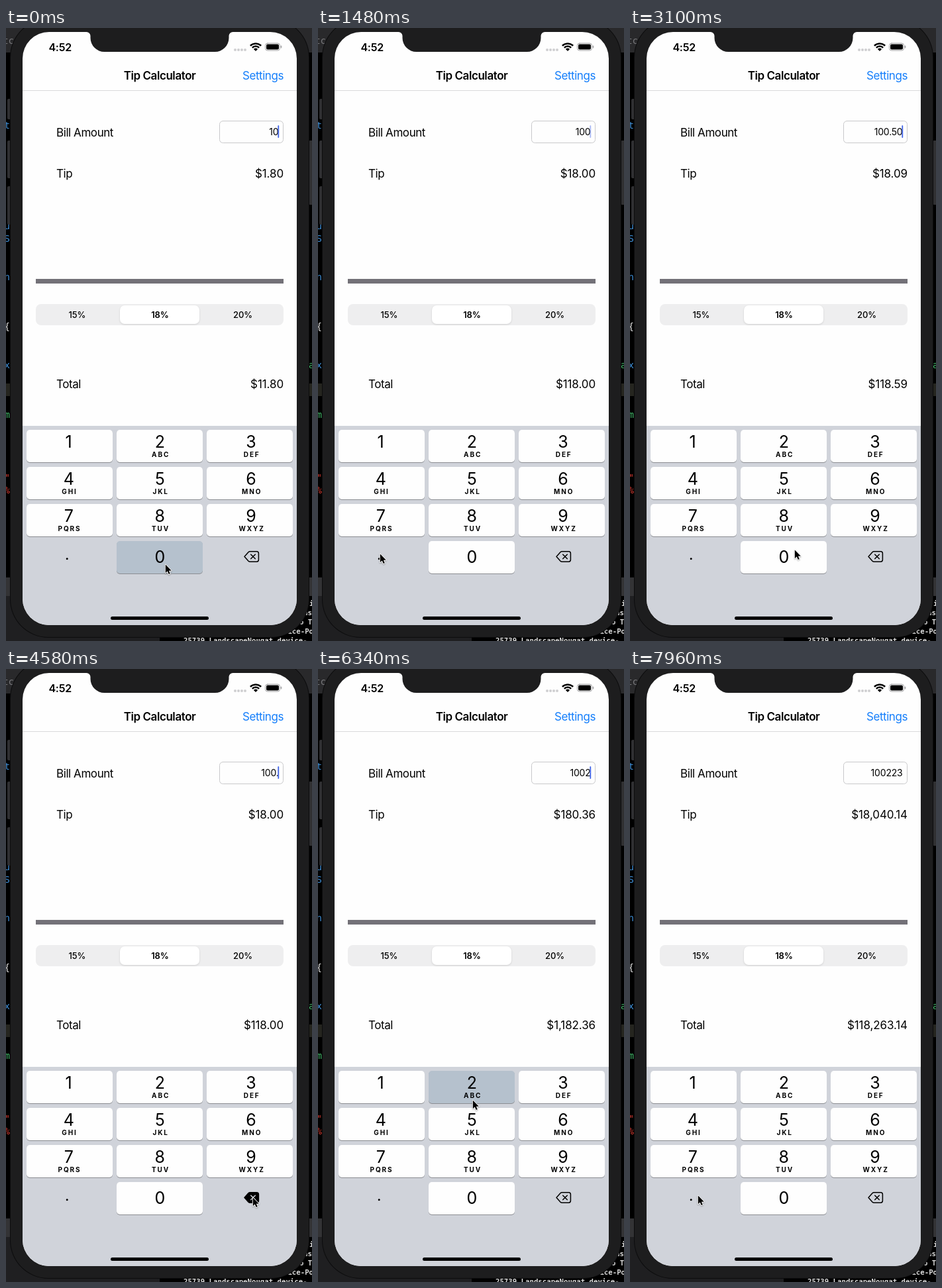
These frames come from a looping animation (462 px wide and 926 px high, 8000 ms). An HTML page with a canvas:

```html
<!DOCTYPE html>
<html lang="en">
<head>
<meta charset="utf-8">
<title>Tip Calculator</title>
<style>
html, body { margin: 0; width: 100%; height: 100%; overflow: hidden; background: #000; }
canvas { display: block; width: 462px; height: 926px; }
</style>
</head>
<body>
<canvas id="stage"></canvas>
<script>
const W = 462, H = 926, LOOP = 8000, STEP = 147.4;
const SANS = 'Inter, "Liberation Sans", sans-serif';
const MONO = '"DejaVu Sans Mono", monospace';
const BLUE = '#147efb';

const canvas = document.getElementById('stage');
const dpr = window.devicePixelRatio || 1;
canvas.width = W * dpr;
canvas.height = H * dpr;
const ctx = canvas.getContext('2d');

// [step, bill text]
const bills = [[-1, '10'], [6, '100'], [12, '100.'], [16, '100.5'], [19, '100.50'],
  [27, '100.5'], [31, '100.'], [35, '100'], [41, '1002'], [44, '10022'], [49, '100223']];

// [key, step down, step up]
const presses = [['0', 0, 1], ['0', 5, 7], ['5', 15, 17], ['del', 26, 28], ['del', 29, 32],
  ['del', 34, 36], ['2', 40, 42], ['2', 43, 44], ['3', 48, 50]];

// [step, x, y] of the pointer tip
const moves = [[0, 240, 809], [7, 240, 809], [10, 93, 793], [12, 93, 793], [15, 236, 688],
  [16, 236, 688], [18, 243, 793], [20, 243, 793], [21, 248, 787], [25, 372, 797],
  [35, 372, 797], [38, 239, 628], [40, 233, 650], [45, 233, 650], [47, 352, 640],
  [49, 350, 642], [53, 104, 794], [54, 102, 794]];

const keys = [['1', ''], ['2', 'ABC'], ['3', 'DEF'], ['4', 'GHI'], ['5', 'JKL'],
  ['6', 'MNO'], ['7', 'PQRS'], ['8', 'TUV'], ['9', 'WXYZ']];

function text(str, x, y, o = {}) {
  const { size = 17, weight = 400, color = '#000', align = 'left', gap = -0.43, font = SANS } = o;
  ctx.font = `${weight} ${size}px ${font}`;
  ctx.letterSpacing = gap + 'px';
  ctx.textAlign = align;
  ctx.fillStyle = color;
  ctx.fillText(str, x, y);
}

function box(x, y, w, h, color, r = 0) {
  ctx.fillStyle = color;
  ctx.beginPath();
  ctx.roundRect(x, y, w, h, r);
  ctx.fill();
}

function poly(points, x = 0, y = 0) {
  ctx.beginPath();
  points.forEach(([px, py]) => ctx.lineTo(x + px, y + py));
  ctx.closePath();
}

function backdrop() {
  box(0, 0, W, H, '#000');
  box(0, 0, W, 37, '#29292b');
  box(0, 537, W, 19, '#25251f');
  box(0, 830, W, 28, '#333335');
  box(0, 858, 232, 68, '#1f1f21');
  const code = (str, y, color, x = 6, align = 'right') =>
    text(str, x, y, { size: 14, font: MONO, gap: 0, color, align });
  code('tc', 24, '#77777a', 12);
  code('t', 152, '#3f8fd8');
  code('u', 304, '#3f8fd8');
  code('S', 323, '#3f8fd8');
  code('n', 381, '#3f8fd8');
  code('{', 456, '#e4e4e4');
  code('x', 514, '#3f8fd8');
  code('m', 589, '#43b96a');
  code('"', 684, '#e03c32');
  code('%', 703, '#e03c32');
  code('a', 514, '#43b96a', 457, 'left');
  const log = { size: 10.7, weight: 700, font: MONO, gap: 0, color: '#dcdcdc' };
  text('i', 458, 873, log);
  text('as', 449, 887, log);
  text('o T', 443, 901, log);
  text('device-Po', 464, 915, { ...log, align: 'right' });
  text('25739 LandscapeNougat device-', 268, 929, log);
}

function phone() {
  box(2, 107, 8, 31, '#303032', 2);
  box(2, 170, 8, 57, '#303032', 2);
  box(2, 239, 8, 58, '#303032', 2);
  box(457, 170, 8, 97, '#303032', 2);
  box(6, -14, 452, 935, '#0c0c0d', 58);
  box(7, -13, 450, 933, '#1d1d1e', 57);
  box(25, 6, 414, 896, '#fefefe', 40);
}

function notch() {
  ctx.fillStyle = '#1d1d1e';
  ctx.beginPath();
  ctx.moveTo(121, 5);
  ctx.lineTo(121, 6);
  ctx.arcTo(127.5, 6, 127.5, 12, 6);
  ctx.arcTo(127.5, 36, 150, 36, 21);
  ctx.arcTo(336.5, 36, 336.5, 12, 21);
  ctx.arcTo(336.5, 6, 343, 6, 6);
  ctx.lineTo(343, 5);
  ctx.fill();
}

function statusBar() {
  text('4:52', 64.5, 34.5, { size: 16, weight: 600, gap: -0.3 });
  for (let i = 0; i < 4; i++) box(344 + i * 5, 31, 4, 4, '#cfcfd1', 2);

  ctx.save();
  ctx.beginPath();
  ctx.moveTo(377, 35);
  ctx.arc(377, 35, 13, -Math.PI * 0.75, -Math.PI * 0.25);
  ctx.clip();
  ctx.strokeStyle = ctx.fillStyle = '#000';
  ctx.lineWidth = 2.5;
  for (const r of [11.6, 7.4]) {
    ctx.beginPath();
    ctx.arc(377, 35, r, Math.PI, 0);
    ctx.stroke();
  }
  ctx.beginPath();
  ctx.arc(377, 35, 4.4, 0, 7);
  ctx.fill();
  ctx.restore();

  ctx.strokeStyle = '#a0a0a2';
  ctx.lineWidth = 1;
  ctx.beginPath();
  ctx.roundRect(391.5, 23, 22, 11, 3.4);
  ctx.stroke();
  box(393, 24.5, 19, 8, '#000', 2);
  box(414.8, 26.5, 1.5, 4, '#a0a0a2', 1);
}

function money(n) {
  return '$' + n.toLocaleString('en-US', { minimumFractionDigits: 2, maximumFractionDigits: 2 });
}

function caretAlpha(age) {
  const a = age % 8;
  return a < 4 ? 1 : a === 4 || a === 7 ? 0.45 : 0;
}

function form(step) {
  box(25, 94, 414, 1, '#dadadb');
  text('Tip Calculator', 232, 78, { weight: 600, align: 'center' });
  text('Settings', 419, 78, { color: BLUE, align: 'right' });
  text('Bill Amount', 76, 164);
  text('Tip', 76, 226);
  text('Total', 76, 544);

  ctx.strokeStyle = '#c9c9cb';
  ctx.lineWidth = 1;
  ctx.beginPath();
  ctx.roundRect(322.5, 140.5, 96, 33, 5);
  ctx.stroke();

  const [since, bill] = bills.filter(b => b[0] <= step).pop();
  text(bill, 411.5, 161.5, { size: 14, gap: -0.2, align: 'right' });
  ctx.globalAlpha = caretAlpha(step - since);
  box(410.4, 147, 1.8, 19, '#3e62e6', 0.9);
  ctx.globalAlpha = 1;

  const tip = parseFloat(bill) * 0.18;
  const amount = { gap: -0.1, align: 'right' };
  text(money(tip), 419, 226, amount);
  text(money(parseFloat(bill) + tip), 419, 544, amount);

  box(45, 379, 374, 7, '#737178');
  box(45, 417, 374, 32, '#eeeeef', 8);
  ctx.save();
  ctx.shadowColor = 'rgba(0,0,0,0.13)';
  ctx.shadowBlur = 3 * dpr;
  ctx.shadowOffsetY = dpr;
  box(172, 419, 120, 28, '#fff', 7);
  ctx.restore();
  ['15%', '18%', '20%'].forEach((s, i) =>
    text(s, 107.5 + i * 125, 438, { size: 13, weight: i === 1 ? 600 : 500, gap: -0.1, align: 'center' }));
}

function key(col, y, name, letters, down) {
  const x = 31 + col * 136;
  box(x, y + 1, 130, 49, '#8b8d92', 5);
  box(x, y, 130, 49, down ? '#b5c1cd' : '#fefefe', 5);
  const mid = 94.7 + col * 137.6;
  text(name, mid, y + (name === '0' ? 32.5 : 26.5), { size: 25, gap: 0, align: 'center' });
  if (letters) text(letters, mid + 1.3, y + 41, { size: 10, weight: 700, gap: 1.9, align: 'center' });
}

function deleteKey(down) {
  ctx.lineJoin = ctx.lineCap = 'round';
  ctx.beginPath();
  ctx.moveTo(360, 798.5);
  ctx.lineTo(366, 791.8);
  ctx.quadraticCurveTo(367, 790.8, 368.5, 790.8);
  ctx.lineTo(378.5, 790.8);
  ctx.quadraticCurveTo(381.4, 790.8, 381.4, 793.7);
  ctx.lineTo(381.4, 803.3);
  ctx.quadraticCurveTo(381.4, 806.2, 378.5, 806.2);
  ctx.lineTo(368.5, 806.2);
  ctx.quadraticCurveTo(367, 806.2, 366, 805.2);
  ctx.closePath();
  ctx.fillStyle = ctx.strokeStyle = '#000';
  ctx.lineWidth = 1.5;
  if (down) ctx.fill();
  ctx.stroke();
  ctx.strokeStyle = down ? '#d0d3da' : '#000';
  ctx.beginPath();
  for (const d of [-3.3, 3.3]) {
    ctx.moveTo(373 - d, 795.2);
    ctx.lineTo(373 + d, 801.8);
  }
  ctx.stroke();
}

function keyboard(step) {
  const isDown = name => presses.some(([k, a, b]) => k === name && step >= a && step < b);
  box(25, 601, 414, 301, '#d0d3da', [0, 0, 40, 40]);
  keys.forEach(([name, letters], i) =>
    key(i % 3, 607 + Math.floor(i / 3) * 56, name, letters, isDown(name)));
  key(1, 775, '0', '', isDown('0'));
  box(90.7, 800.2, 3, 3, '#000', 1.5);
  deleteKey(isDown('del'));
  box(158, 889, 148, 5, '#000', 2.5);
}

function pointer(step) {
  let i = moves.findIndex(m => m[0] > step);
  if (i < 0) i = moves.length - 1;
  const [s0, x0, y0] = moves[i - 1], [s1, x1, y1] = moves[i];
  const u = Math.min(1, (step - s0) / (s1 - s0));
  const e = u * u * (3 - 2 * u);
  ctx.save();
  ctx.shadowColor = 'rgba(0,0,0,0.3)';
  ctx.shadowBlur = 2 * dpr;
  ctx.shadowOffsetY = dpr;
  poly([[0, 0], [0, 12.6], [2.9, 10], [4.9, 14.5], [7, 13.6], [5.1, 9.2], [9, 9.2]],
    x0 + (x1 - x0) * e + 0.8, y0 + (y1 - y0) * e + 1.6);
  ctx.lineJoin = 'round';
  ctx.lineWidth = 1.8;
  ctx.strokeStyle = '#fff';
  ctx.stroke();
  ctx.restore();
  ctx.fillStyle = '#000';
  ctx.fill();
}

function draw(now) {
  const step = Math.min(54, Math.floor((now % LOOP + 4) / STEP));
  ctx.setTransform(dpr, 0, 0, dpr, 0, 0);
  backdrop();
  phone();
  notch();
  statusBar();
  form(step);
  keyboard(step);
  pointer(step);
}

let start;
function frame(now) {
  start ??= now;
  draw(now - start);
  requestAnimationFrame(frame);
}
draw(0);
requestAnimationFrame(frame);
</script>
</body>
</html>
```
